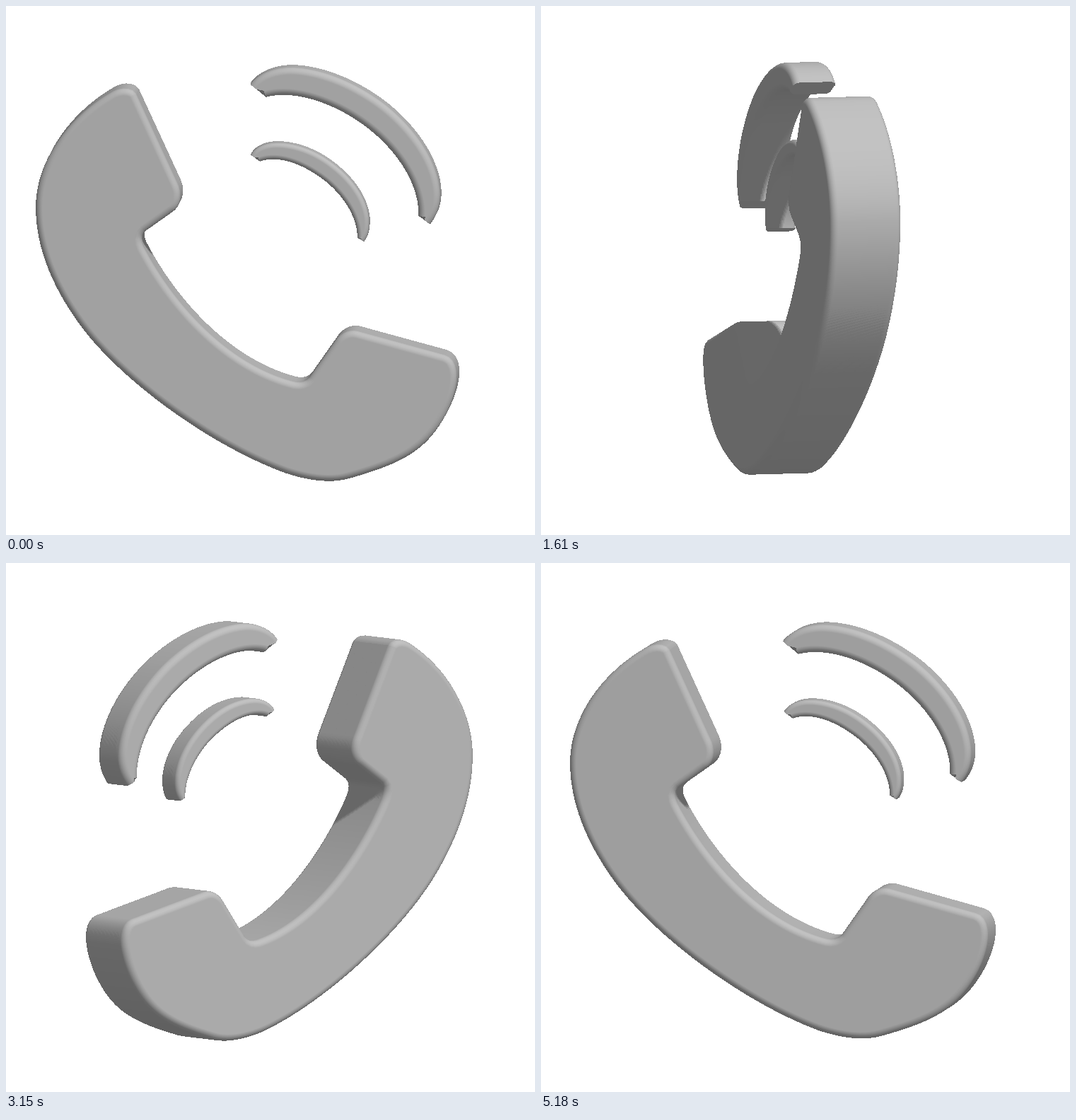
Write an HTML page with a canvas that moves like this. It is 748 by 748 pixels and loops after 5250 ms.

```html
<!DOCTYPE html>
<html lang="en">
<head>
<meta charset="utf-8">
<title>Ringing phone</title>
<style>
html, body { margin: 0; width: 100%; height: 100%; overflow: hidden; background: #fff; }
canvas { display: block; }
</style>
</head>
<body>
<canvas id="stage" width="748" height="748"></canvas>
<script>
const SIZE = 748, MID = 374, AXIS = 364.4;
const STEP = 70, STEPS = 75, START = -2.4;
const PITCH = Math.asin(0.08);
const LIGHT = [32, -58, 64], AMBIENT = 103;
const MAP_SCALE = 0.8, BIAS = 10;

const verts = [], tris = [];

function addVert(x, y, z, nx, ny, nz) {
  return verts.push([x, y, z, nx, ny, nz]) - 1;
}

function quad(a, b, c, d) {
  tris.push([a, b, c], [b, d, c]);
}

// Evenly spaced points on a path, each with its outward normal
function sample(d, count, side) {
  const path = document.createElementNS('http://www.w3.org/2000/svg', 'path');
  path.setAttribute('d', d);
  const len = path.getTotalLength();
  return Array.from({ length: count + 1 }, (_, i) => {
    const at = len * i / count;
    const p = path.getPointAtLength(at);
    const a = path.getPointAtLength(Math.max(0, at - 1));
    const b = path.getPointAtLength(Math.min(len, at + 1));
    const l = Math.hypot(b.x - a.x, b.y - a.y) || 1;
    return { x: p.x - AXIS, y: p.y - MID,
             nx: side * (b.y - a.y) / l, ny: -side * (b.x - a.x) / l };
  });
}

// Cross-section of the rim: rounded front edge, wall, rounded back edge
function rim(half, radius) {
  const k = 5, front = [];
  for (let i = 0; i <= k; i++) {
    const a = Math.PI / 2 * i / k, s = Math.sin(a), c = Math.cos(a);
    front.push({ inset: radius * (1 - s), z: half - radius * (1 - c), s, c });
  }
  const back = front.map(f => ({ ...f, z: -f.z, c: -f.c })).reverse();
  return front.concat(back);
}

function addPart({ outer, inner, count, z, half, radius, shrink, capped }) {
  const levels = rim(half, radius), last = levels.length - 1;
  const build = (d, side) => sample(d, count, side).map(p => levels.map(l => {
    const off = l.inset + shrink;
    return addVert(p.x - p.nx * off, p.y - p.ny * off, z + l.z,
                   p.nx * l.s, p.ny * l.s, l.c);
  }));
  const o = build(outer, -1), n = build(inner, 1);

  for (let i = 0; i < count; i++) {
    for (const g of [o, n])
      for (let j = 0; j < last; j++)
        quad(g[i][j], g[i + 1][j], g[i][j + 1], g[i + 1][j + 1]);
    for (const j of [0, last]) quad(o[i][j], o[i + 1][j], n[i][j], n[i + 1][j]);
  }
  if (!capped) return;
  for (const [i, sign] of [[0, 1], [count, -1]]) {
    const m = last >> 1, a = verts[o[i][m]], b = verts[n[i][m]];
    const dx = b[0] - a[0], dy = b[1] - a[1], l = Math.hypot(dx, dy);
    const flat = id => addVert(...verts[id].slice(0, 3), sign * dy / l, -sign * dx / l, 0);
    const p = o[i].map(flat), q = n[i].map(flat);
    for (let j = 0; j < last; j++) quad(p[j], q[j], p[j + 1], q[j + 1]);
  }
}

// Handset
addPart({
  outer: 'M187 119 C182 110 166 107 151 115 C84 153 40 220 41 283 C41 345 70 405 108 455' +
         'C170 536 299 626 400 661 C440 673 468 673 490 666 C545 650 580 635 605 605' +
         'C630 575 641 540 641 520 C641 505 636 491 622 487',
  inner: 'M187 119 L246 247 C253 262 250 281 238 289 L200 316 C193 321 194 328 198 337' +
         'C239 416 316 503 410 526 C420 528 426 524 429 520 L464 470' +
         'C472 457 486 450 500 454 L622 487',
  count: 150, z: -3.6, half: 52.5, radius: 10, shrink: 2
});
// Large wave
addPart({
  outer: 'M602 304 C612 291 617 276 616 258 C613 215 583 170 540 135' +
         'C500 104 450 82 405 81 C380 81 358 90 346 105',
  inner: 'M584 292 C585 245 550 195 505 163 C465 134 410 114 369 125',
  count: 70, z: 18.5, half: 32, radius: 10, shrink: 0.8, capped: true
});
// Small wave
addPart({
  outer: 'M508 330 C514 322 516 310 515 296 C511 262 485 232 455 212' +
         'C428 194 400 188 380 189 C365 190 352 196 346 206',
  inner: 'M497 324 C497 290 470 255 440 236 C412 217 382 209 360 217',
  count: 60, z: 17.5, half: 21.5, radius: 7, shrink: 0.8, capped: true
});

const dot = (a, b) => a[0] * b[0] + a[1] * b[1] + a[2] * b[2];
const cross = (a, b) => [a[1] * b[2] - a[2] * b[1], a[2] * b[0] - a[0] * b[2], a[0] * b[1] - a[1] * b[0]];
const unit = a => a.map(v => v / Math.hypot(...a));
const lw = unit(LIGHT), lu = unit(cross([0, 1, 0], lw)), lv = cross(lw, lu);

const buffer = () => new Float32Array(SIZE * SIZE);
const depth = buffer(), shade = buffer(), lightMap = buffer();
const ctx = document.getElementById('stage').getContext('2d');
const image = ctx.createImageData(SIZE, SIZE);
const pixels = new Uint32Array(image.data.buffer);

// Points are [x, y, depth, shade]
function raster(pts, zbuf, sbuf) {
  zbuf.fill(-1e9);
  for (const [ia, ib, ic] of tris) {
    const a = pts[ia], b = pts[ib], c = pts[ic];
    const area = (b[0] - a[0]) * (c[1] - a[1]) - (c[0] - a[0]) * (b[1] - a[1]);
    if (Math.abs(area) < 1e-6) continue;
    const x0 = Math.max(0, Math.ceil(Math.min(a[0], b[0], c[0])));
    const x1 = Math.min(SIZE - 1, Math.floor(Math.max(a[0], b[0], c[0])));
    const y0 = Math.max(0, Math.ceil(Math.min(a[1], b[1], c[1])));
    const y1 = Math.min(SIZE - 1, Math.floor(Math.max(a[1], b[1], c[1])));
    const bx = (c[1] - a[1]) / area, by = (a[0] - c[0]) / area;
    const cx = (a[1] - b[1]) / area, cy = (b[0] - a[0]) / area;
    for (let y = y0; y <= y1; y++) {
      let wb = (x0 - a[0]) * bx + (y - a[1]) * by;
      let wc = (x0 - a[0]) * cx + (y - a[1]) * cy;
      for (let x = x0; x <= x1; x++, wb += bx, wc += cx) {
        const wa = 1 - wb - wc;
        if (wa < -1e-6 || wb < -1e-6 || wc < -1e-6) continue;
        const z = wa * a[2] + wb * b[2] + wc * c[2], i = y * SIZE + x;
        if (z <= zbuf[i]) continue;
        zbuf[i] = z;
        if (sbuf) sbuf[i] = wa * a[3] + wb * b[3] + wc * c[3];
      }
    }
  }
}

const toLight = p => [MID + MAP_SCALE * dot(p, lu), MID + MAP_SCALE * dot(p, lv), dot(p, lw)];

// Share of light that reaches a point, softened over nine taps
function reach(p) {
  const [u, v, w] = toLight(p);
  const x = Math.round(u), y = Math.round(v);
  let sum = 0;
  for (let j = -2; j <= 2; j += 2)
    for (let i = -2; i <= 2; i += 2)
      if (!(lightMap[(y + j) * SIZE + x + i] > w + BIAS)) sum++;
  return sum / 9;
}

function draw(degrees) {
  const t = degrees * Math.PI / 180, ct = Math.cos(t), st = Math.sin(t);
  const cp = Math.cos(PITCH), sp = Math.sin(PITCH);
  const turn = (x, y, z) => {
    const d = z * ct - x * st;
    return [x * ct + z * st, y * cp + d * sp, d * cp - y * sp];
  };
  const view = verts.map(v => turn(v[0], v[1], v[2]));
  raster(view.map(toLight), lightMap);
  raster(view.map((p, i) => {
    const v = verts[i];
    return [p[0] + AXIS, p[1] + MID, p[2], dot(turn(v[3], v[4], v[5]), LIGHT)];
  }), depth, shade);

  pixels.fill(0xffffffff);
  for (let y = 0, i = 0; y < SIZE; y++)
    for (let x = 0; x < SIZE; x++, i++) {
      if (depth[i] < -1e8) continue;
      const s = shade[i];
      const g = AMBIENT + (s > 0 ? s * reach([x - AXIS, y - MID, depth[i]]) : s * 0.12);
      pixels[i] = 0xff000000 | Math.round(g) * 0x010101;
    }
  ctx.putImageData(image, 0, 0);
}

let shown = -1;
function tick() {
  const step = Math.floor(performance.now() / STEP) % STEPS;
  if (step !== shown) draw(START + 360 * step / STEPS);
  shown = step;
  requestAnimationFrame(tick);
}
tick();
</script>
</body>
</html>
```
